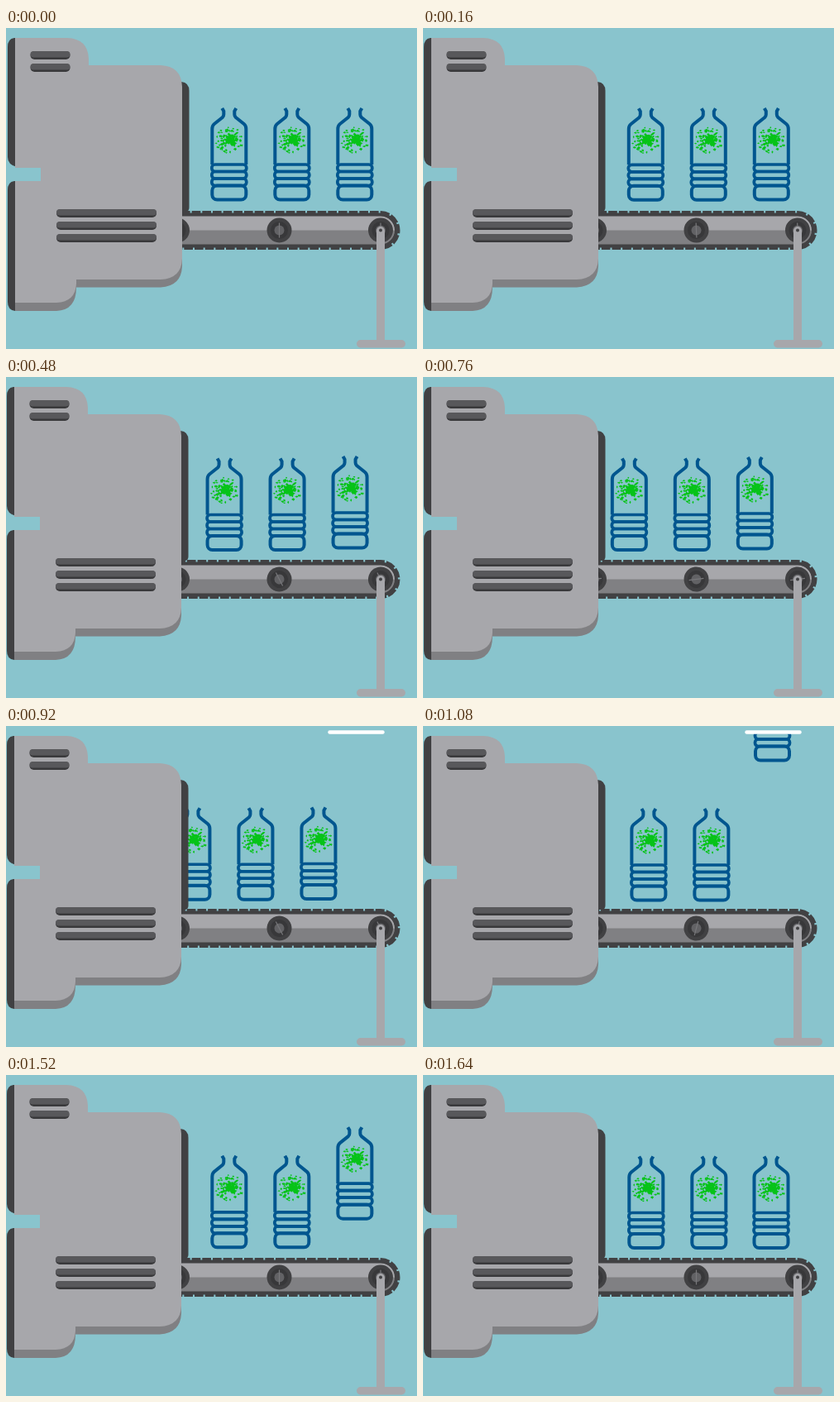
These frames come from a looping animation (497x388 px, 1.68 s). An HTML page:

```html
<!DOCTYPE html>
<html lang="en">
<head>
<meta charset="utf-8">
<title>Bottle conveyor</title>
<style>
  html, body { margin: 0; width: 100%; height: 100%; overflow: hidden; background: #89c4cd; }
  svg { display: block; width: 497px; height: 388px; }
  .body { fill: #a7a7ab; }
  .shade { fill: #808083; }
  .dark { fill: #414143; }
  .glass { fill: none; stroke: #00568f; stroke-width: 4; }
  .track { fill: none; stroke: #414143; }
</style>
</head>
<body>
<svg viewBox="0 0 497 388">
  <defs>
    <clipPath id="below"><rect y="8" width="497" height="380"/></clipPath>
    <g id="bottle">
      <g class="glass">
        <path d="M14.500 0L16.500 3.500V7.500Q16.500 9.500 15 11L5 19Q2.500 21 2.500 25V68M31.500 0L29.500 3.500V7.500Q29.500 9.500 31 11L41 19Q43.500 21 43.500 25V68"/>
        <rect x="2.500" y="93.500" width="41" height="17" rx="6"/>
        <g stroke-width="3.700">
          <rect x="2" y="68" width="42" height="8.500" rx="4"/>
          <rect x="2" y="76.500" width="42" height="8.500" rx="4"/>
          <rect x="2" y="85" width="42" height="8.500" rx="4"/>
        </g>
      </g>
      <path id="splat" fill="#06c318"/>
    </g>
    <g id="wheel">
      <circle r="15" fill="#414143"/>
      <circle r="10.500" fill="#38383a"/>
      <circle r="6" fill="#626265"/>
      <path d="M0-9V9" stroke="#78787b" stroke-width="1.200"/>
    </g>
    <g id="slot-s">
      <rect width="48" height="10" rx="5" fill="#39393b"/>
      <rect width="48" height="7.500" rx="3.750" fill="#58585b"/>
    </g>
    <g id="slot-l">
      <rect width="121" height="10" rx="5" fill="#39393b"/>
      <rect width="121" height="7.500" rx="3.750" fill="#58585b"/>
    </g>
  </defs>

  <rect width="497" height="388" fill="#89c4cd"/>

  <!-- conveyor -->
  <path class="shade" d="M190 225H453a19.500 19.500 0 0 1 0 39H190z"/>
  <path class="body" d="M190 226H453a18.500 18.500 0 0 1 18.500 18.500H190z"/>
  <path class="track" d="M190 263.500H453a19 19 0 0 0 0-38H190" stroke-width="4"/>
  <path id="belt" class="track" d="M190 265H453a20.500 20.500 0 0 0 0-41H190" stroke-width="6" stroke-dasharray="10.667 2"/>
  <g id="wheels"></g>
  <path d="M453 245V380" stroke="#a7a7ab" stroke-width="10" stroke-linecap="round"/>
  <rect class="body" x="424" y="377" width="59" height="9.500" rx="4.700"/>
  <circle class="dark" cx="453" cy="244.500" r="2"/>

  <path id="burst" fill="#d4eaee"/>
  <g id="bottles" clip-path="url(#below)"></g>
  <path id="hatch" stroke="#fff" stroke-width="4.500" stroke-linecap="round"/>

  <g id="machine">
    <path class="dark" d="M205 65H211Q220.500 66 220.500 76V217Q220.500 222 216 222H205z"/>
    <path class="dark" d="M12 12H9Q1 13 1 23V156Q1 165 12 168z"/>
    <path class="dark" d="M12 185H9Q1 186 1 196V331Q1 341 10 342H12z"/>
    <path class="shade" d="M10 200H212V288Q211 312 186 313.500H84Q84 341 60 342H10z"/>
    <path class="body" d="M10 12H73Q98 13 99 37V45H186Q211 46 212 71V279Q211 303 186 304H84V309Q83 331 60 332H10V185H41V169H10z"/>
    <use href="#slot-s" x="28.500" y="28"/>
    <use href="#slot-s" x="28.500" y="43"/>
    <use href="#slot-l" x="60" y="219"/>
    <use href="#slot-l" x="60" y="234"/>
    <use href="#slot-l" x="60" y="249"/>
    <path d="M10 169H41V185H10z" fill="#89c4cd"/>
  </g>
</svg>
<script>
const LOOP = 1680, STEP = 40, PITCH = 76, FIRST = 246.8;
const $ = id => document.getElementById(id);

function add(parent, href) {
  const el = document.createElementNS('http://www.w3.org/2000/svg', 'use');
  el.setAttribute('href', href);
  return $(parent).appendChild(el);
}
const move = (el, x, y, extra = '') =>
  el.setAttribute('transform', `translate(${x} ${y}) ${extra}`);

// Linear interpolation through [time, value] pairs
function track(keys, t) {
  let i = 1;
  while (i < keys.length - 1 && t > keys[i][0]) i++;
  const [t0, a] = keys[i - 1], [t1, b] = keys[i];
  return a + (b - a) * Math.min(1, Math.max(0, (t - t0) / (t1 - t0)));
}

// Slow start, sudden rush, soft stop: cubic-bezier(1, 0, .65, 1)
function rush(p) {
  if (p >= 1) return 1;
  let lo = 0, hi = 1;
  for (let i = 0; i < 24; i++) {
    const s = (lo + hi) / 2, r = 1 - s;
    if (3 * s * r * r + 1.95 * s * s * r + s * s * s < p) lo = s; else hi = s;
  }
  return lo * lo * (3 - 2 * lo);
}

// Dense core with specks thinning out around it
function drawSplat() {
  let seed = 11, d = '';
  const rnd = () => (seed = (seed * 16807) % 2147483647) / 2147483647;
  for (let i = 0; i < 120; i++) {
    const a = rnd() * 6.283, far = Math.pow(rnd(), 1.2);
    const x = 23.5 + 17.5 * far * Math.cos(a), y = 39 + 16 * far * Math.sin(a);
    const size = 1.45 - far;
    const w = 0.8 + 2.1 * rnd() * size, h = 0.8 + 1.9 * rnd() * size;
    d += `M${x - w} ${y}L${x} ${y - h}L${x + w} ${y - h * 0.3}L${x + w * 0.3} ${y + h}z`;
  }
  $('splat').setAttribute('d', d);
}

function drawBurst() {
  let d = 'M-12 98';
  for (let i = 0; i < 11; i++) {
    const reach = 21 * Math.sqrt(Math.sin(Math.PI * (i + 0.8) / 12));
    const y = 99 + i * 9.6;
    d += `L${reach - 10} ${y}L${reach} ${y + 5}`;
  }
  $('burst').setAttribute('d', d + 'L2 205H-12z');
}

const BOB = [[0, 97], [320, 97.6], [480, 98.5], [760, 98.5], [1080, 100], [1360, 97], [1640, 98.5], [1680, 97]];
const BOB_LAST = [[0, 97], [320, 97], [480, 96], [760, 97], [1080, 100], [1360, 97], [1640, 98.5], [1680, 97]];
const DROP = [[960, -105], [1080, -69], [1360, 16], [1640, 98.5], [1680, 97]];
const HATCH = [[800, 0], [920, 32], [1240, 32], [1360, 0]];
const BURST = [[1200, 0], [1320, 1], [1400, 1], [1520, 0]];

drawSplat();
drawBurst();
const bottles = [0, 1, 2, 3].map(() => add('bottles', '#bottle'));
const wheels = [207, 330.5, 453].map(x => ({ x, el: add('wheels', '#wheel') }));

function render(t) {
  const p = rush(t / 1200);

  for (let i = 0; i < 3; i++)
    move(bottles[i], FIRST + PITCH * (i - p), track(i === 2 ? BOB_LAST : BOB, t));
  move(bottles[3], track([[1080, 399.5], [1360, 400], [1640, 398]], t), track(DROP, t));

  for (const w of wheels) move(w.el, w.x, 244.5, `rotate(${-360 * p})`);
  $('belt').setAttribute('stroke-dashoffset', -PITCH * p);

  const half = track(HATCH, t);
  $('hatch').setAttribute('d', half ? `M${423.5 - half} 7.5H${423.5 + half}` : '');

  const b = track(BURST, t);
  $('burst').setAttribute('opacity', b);
  move($('burst'), 221, 0, `scale(${b} 1)`);

  move($('machine'), t < 80 ? 1 : 0, 0);
}

function tick(now) {
  render(Math.floor((now % LOOP) / STEP) * STEP);
  requestAnimationFrame(tick);
}
render(0);
requestAnimationFrame(tick);
</script>
</body>
</html>
```
